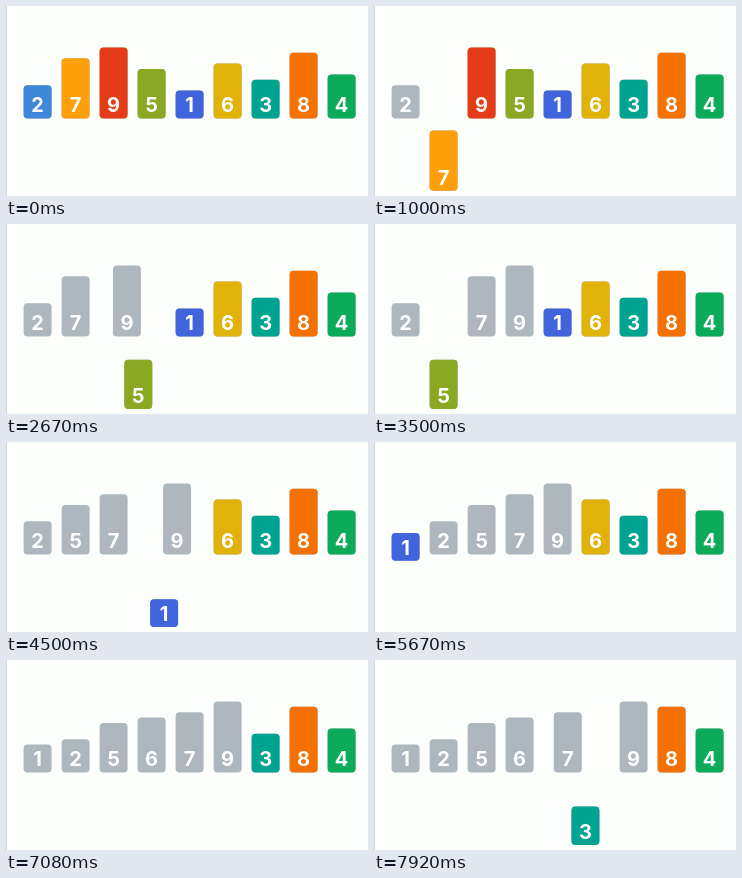
Animation of 362x190 px, one loop 8 s. Source, as an HTML page with a canvas:

```html
<!DOCTYPE html>
<html lang="en">
<head>
<meta charset="utf-8">
<title>Insertion sort</title>
<style>
html, body { margin: 0; height: 100%; overflow: hidden; background: #fdfffc; }
canvas { display: block; }
</style>
</head>
<body>
<canvas id="stage" width="362" height="190"></canvas>
<script>
const ctx = document.getElementById('stage').getContext('2d');
const LOOP = 8000, BEAT = 1000 / 12;
const LEFT = 17.6, PITCH = 38, WIDTH = 28, FLOOR = 112.4, DROP = 72.7;
const MOVE = 250, RISE = 160, LEAD = 4.5 * BEAT;
const GREY = '#adb7bd';
const order = [2, 7, 9, 5, 1, 6, 3, 8, 4];
const colors = ['#4064dc', '#3f87d9', '#00a38f', '#0cab5a', '#8ba823',
  '#e0b20a', '#ff9f0c', '#f47100', '#e23b15'];

// Beats on which each key, in order, drops out and rises back.
const cues = [[7, 12], [17, 22.55], [26.5, 43], [47.5, 66.3], [69.5, 83], [87.5, 101]];

// Insertion sort: each key passes all larger sorted bars, evenly spaced in time.
const sorted = [order[0]];
const inserts = cues.map(([drop, rise], i) => {
  const key = order[i + 1];
  const passed = sorted.filter(n => n > key).reverse();
  sorted.push(key);
  sorted.sort();
  return { key, passed, drop: drop * BEAT, rise: rise * BEAT };
});

const progress = (t, start, length) => Math.min(1, Math.max(0, (t - start) / length));

function layout(t) {
  const bars = {};
  order.forEach((n, i) => bars[n] = { col: i, down: 0, grey: 0 });
  bars[order[0]].grey = progress(t, 0, 500);
  for (const { key, passed, drop, rise } of inserts) {
    const bar = bars[key];
    const first = drop + LEAD;
    bar.down = progress(t, drop, MOVE) - progress(t, rise, RISE);
    bar.grey = t >= rise + RISE ? 1 : 0;
    passed.forEach((other, i) => {
      const p = progress(t, first + (rise - first) * i / passed.length, MOVE);
      bar.col -= p;
      bars[other].col += p;
    });
  }
  return bars;
}

function drawBar(n, { col, down, grey }) {
  const x = LEFT + PITCH * col;
  const bottom = FLOOR + DROP * down;
  const height = 22.4 + 5.4 * n;
  ctx.beginPath();
  ctx.roundRect(x, bottom - height, WIDTH, height, 4);
  ctx.fillStyle = GREY;
  ctx.fill();
  ctx.globalAlpha = 1 - grey;
  ctx.fillStyle = colors[n - 1];
  ctx.fill();
  ctx.globalAlpha = 1;
  ctx.fillStyle = '#fff';
  ctx.fillText(n, x + WIDTH / 2, bottom - 6);
}

function draw(t) {
  ctx.fillStyle = '#fdfffc';
  ctx.fillRect(0, 0, 362, 190);
  ctx.fillStyle = '#d8d8d8';
  ctx.fillRect(0, 0, 1, 190);
  ctx.font = '700 20px Inter, sans-serif';
  ctx.textAlign = 'center';
  const bars = layout(t);
  order.forEach(n => drawBar(n, bars[n]));
}

const begin = performance.now();
function tick() {
  draw((performance.now() - begin) % LOOP);
  requestAnimationFrame(tick);
}
tick();
</script>
</body>
</html>
```
